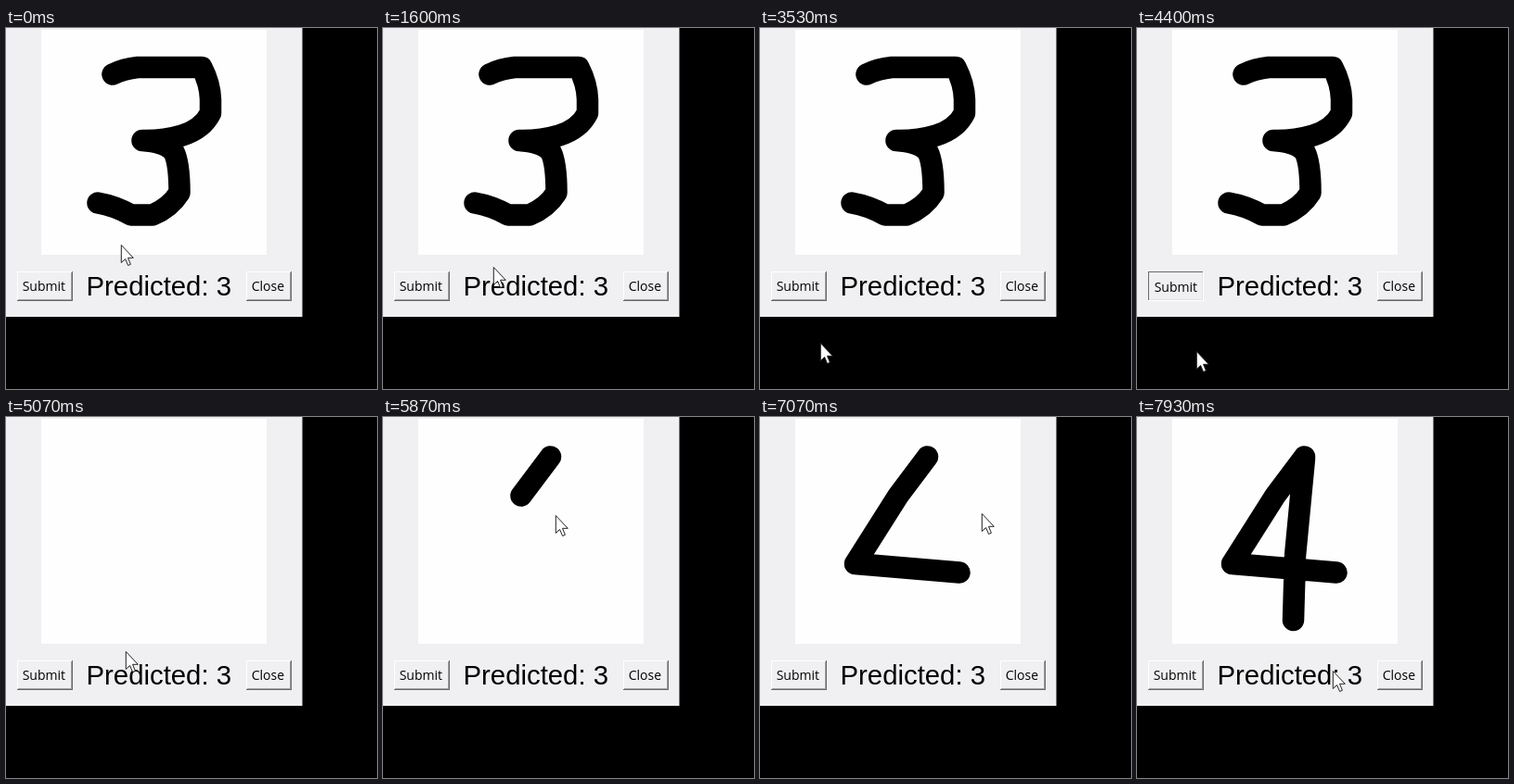
Animation, 400 px wide and 390 px high, one loop 8000 ms. Source, as an HTML page:

```html
<!DOCTYPE html>
<html>
<head>
<meta charset="utf-8">
<title>Digit pad</title>
<style>
  html, body { margin: 0; width: 100%; height: 100%; overflow: hidden; background: #000; }
  svg { display: block; width: 400px; height: 390px; }
  .ink { fill: none; stroke: #000; stroke-width: 23.5; stroke-linecap: round; stroke-linejoin: round; }
  .edge { fill: none; stroke-width: 1; shape-rendering: crispEdges; }
  .label { font: 14px "Open Sans", sans-serif; }
  .result { font: 29.33px "Liberation Sans", Arial, sans-serif; }
</style>
</head>
<body>
<svg viewBox="0 0 400 390">
  <rect width="400" height="390"/>
  <rect width="319.500" height="312" fill="#f0eff1"/>
  <rect x="38" y="2" width="243" height="243" fill="#fefefe"/>
  <path id="three" class="ink" d="M115 50 Q127 44 142 42.500 H211 Q220 60 220.500 77 V92 Q212 109 190 116 Q170 122 147 121.500 Q172 123 181 134 Q187 146 187 178 Q177 194 158 202 H135 Q117 192 99 189"/>
  <path id="four" class="ink"/>
  <text class="result" x="86.500" y="289">Predicted: 3</text>
  <g id="buttons"></g>
  <path id="cursor" d="M.3 .5 V19.500 L4.600 15.500 L7.600 22.500 L10.400 21.300 L7.500 14.300 H13.300 Z" fill="#fff" stroke="#222"/>
</svg>
<script>
const LOOP = 8000;
const PRESS = 4200, CLEAR = 4800;
const POINTER_SCALE = 1.25; // the pointer is shown at a larger scale than the pen
const HOME = { x: 99.2, y: 187.4 };
const $ = id => document.getElementById(id);

const move = (from, to, x, y) => ({ from, to, x, y });
const draw = (from, to, x, y) => ({ from, to, x, y, ink: true });

// The pen rests wherever one leg ends until the next begins.
const legs = [
  move(1000, 1270, 95.2, 206.4),
  move(1600, 3530, 51.6, 272),
  move(3530, 3900, 51, 279),
  move(4800, 5070, 103.2, 202),
  move(5070, 5560, 180.5, 43),
  draw(5650, 5870, 149, 85),
  draw(5870, 6250, 102.5, 158.5),
  draw(6250, 6830, 215, 168),
  move(6850, 7170, 180.5, 45),
  draw(7400, 7720, 170.5, 150),
  draw(7720, 7920, 168.5, 219.5)
];

function trace(t) {
  let { x, y } = HOME, ink = "";
  for (const leg of legs) {
    if (t < leg.from) break;
    const p = Math.min(1, (t - leg.from) / (leg.to - leg.from));
    const nx = x + (leg.x - x) * p, ny = y + (leg.y - y) * p;
    if (leg.ink) ink += `${ink ? "L" : "M"}${x} ${y}L${nx} ${ny + .01}`;
    else if (ink) ink += `M${nx} ${ny}`;
    x = nx;
    y = ny;
  }
  return { x, y, ink: ink.replace(/M[^ML]*$/, "") };
}

function buttonMarkup(x, w, name) {
  const r = x + w;
  return `<g>
    <path class="edge" d="M${x + .5} 294 V263.500 H${r - 1}"/>
    <path class="edge" d="M${x} 294.500 H${r - .5} V263"/>
    <path class="edge" d="M${x + 1} 293.500 H${r - 1.5} V264"/>
    <text class="label" x="${x + 5.7}" y="284">${name}</text>
  </g>`;
}

function setPressed(button, pressed) {
  const [light, dark, inner] = button.querySelectorAll("path");
  light.setAttribute("stroke", pressed ? "#696969" : "#fff");
  dark.setAttribute("stroke", pressed ? "#fff" : "#696969");
  inner.setAttribute("stroke", pressed ? "#e3e3e3" : "#a0a0a0");
  button.querySelector("text").setAttribute("transform", pressed ? "translate(1 1)" : "");
}

$("buttons").innerHTML = buttonMarkup(12, 59.5, "Submit") + buttonMarkup(259, 48.5, "Close");
const [submit, close] = $("buttons").children;
setPressed(close, false);

function render(t) {
  const pen = trace(t);
  const x = Math.round(pen.x * POINTER_SCALE), y = Math.round(pen.y * POINTER_SCALE);
  $("cursor").setAttribute("transform", `translate(${x} ${y})`);
  $("three").style.display = t < CLEAR ? "" : "none";
  $("four").setAttribute("d", pen.ink);
  setPressed(submit, t >= PRESS && t < CLEAR);
}

let start;
function tick(now) {
  start ??= now;
  render((now - start) % LOOP);
  requestAnimationFrame(tick);
}
render(0);
requestAnimationFrame(tick);
</script>
</body>
</html>
```
